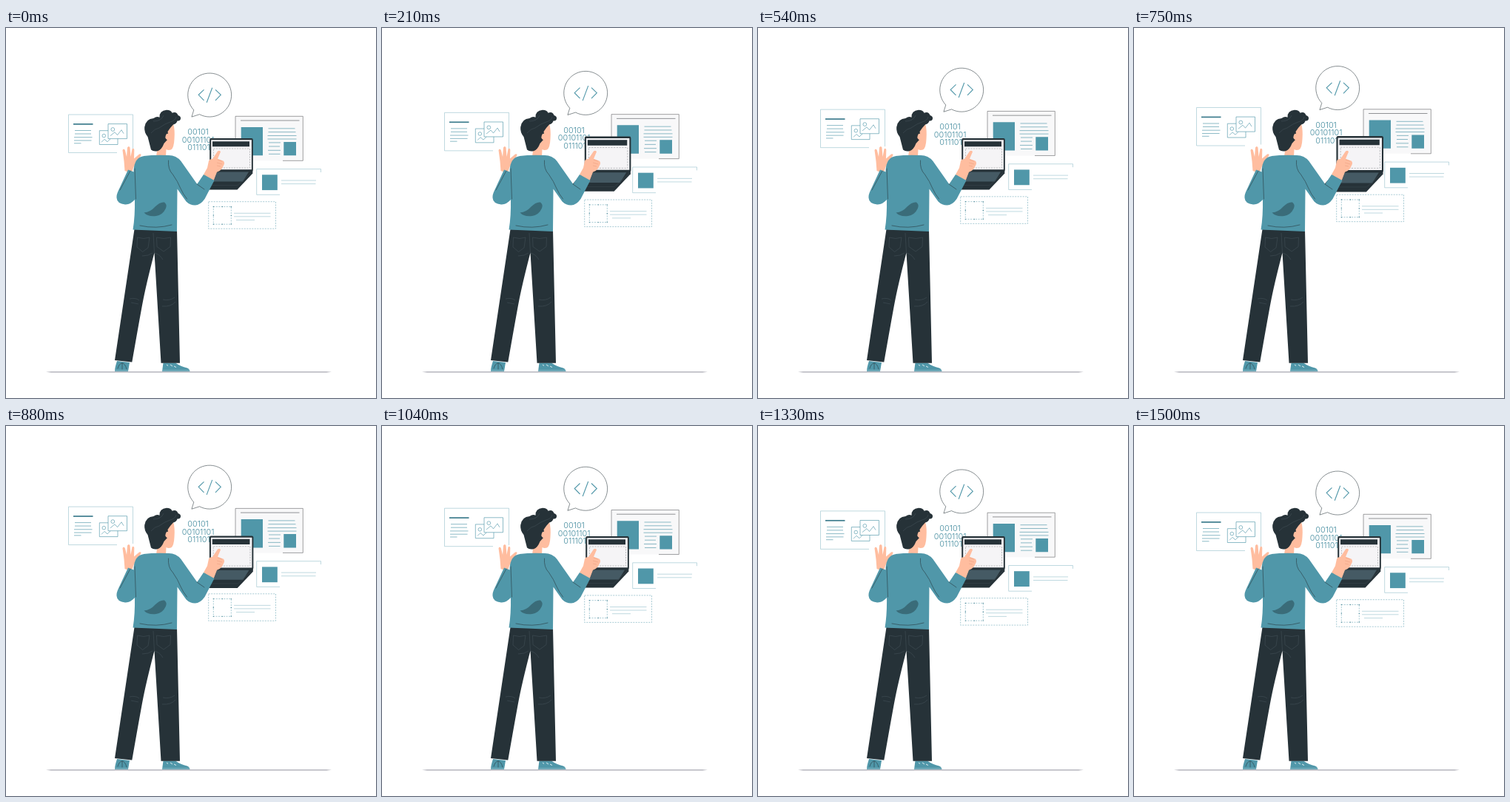
Animation of 500 by 500 pixels, one loop 1.54 s. Source, as an HTML page:

```html
<!DOCTYPE html>
<html lang="en">
<head>
<meta charset="utf-8">
<title>Developer at work</title>
<style>
  html, body { margin: 0; width: 100%; height: 100%; overflow: hidden; background: #fff; }
  svg { display: block; width: 100%; height: 100%; }
  .teal { fill: #5097a9; }
  .dark { fill: #263238; }
  .skin { fill: #ffbd9f; }
  .line { fill: none; stroke: #5097a9; stroke-width: .65; }
  .pale { fill: none; stroke: #9cc5d0; stroke-width: .65; }
  .ink { fill: none; stroke: #263238; stroke-width: .55; stroke-linecap: round; }
  .seam { fill: none; stroke: #46545c; stroke-width: .5; }
  .dash { fill: none; stroke: #5097a9; stroke-width: .5; stroke-dasharray: 2 1.5; }
  .white { fill: #fff; }
  .bold { stroke-width: 1.1; }
  text { font: 300 10.8px Inter, Lato, sans-serif; fill: #418a9d; }
</style>
</head>
<body>
<svg viewBox="0 0 500 500">
  <path d="M54 464.800l7-.9H433l7 .9-7 .9H61z" fill="#bfbfc6"/>

  <g id="floating">
    <!-- picture card -->
    <path class="pale" d="M150 168.500H84.500V117H171.500V167"/>
    <path d="M91 129.900h26.500" stroke="#3d7c8d" stroke-width="1.700"/>
    <path class="line" d="M93 138.500h22M93 143h22M92 147.700h24.500M92 152h23.500M92 155.800h9.500"/>
    <g class="line">
      <path d="M151 157.500h-24.700V138.700h24.700z" class="white"/>
      <circle cx="132.300" cy="145.600" r="2.300"/>
      <path d="M129 154.300l4-4 4 3.500 4-4"/>
      <path d="M138 129.600h25.500v20H138z" class="white"/>
      <circle cx="144.300" cy="137" r="2.400"/>
      <path d="M141 145.700l6-5 3.500 4 5.500-7 3 5"/>
    </g>

    <!-- speech bubble -->
    <path class="ink" d="M253.500 110.600A29.500 29.500 0 1 1 261.500 116.700L251.300 120z"/>
    <path class="line bold" d="M267.500 83.300l-7.300 7 7.300 7.500M278.700 80.800l-7.500 20M283 83.300l7.300 7-7.300 7.500"/>

    <text x="245.300" y="144.200">00101</text>
    <text x="237.800" y="154.900">00101101</text>
    <text x="245.300" y="165.200">011101</text>

    <!-- article panel -->
    <path d="M310 119.300h91.300v60H310z" fill="#f8f8f9"/>
    <path d="M310 179.300V119.300h91.300v60H374" fill="none" stroke="#6c6e72" stroke-width=".65"/>
    <path d="M317 125h79.500" stroke="#85878b" stroke-width=".9"/>
    <path class="teal" d="M317.700 134H347v38.300h-29.300zM375.300 154H392v18.300h-16.700z"/>
    <path class="line" d="M354.500 135.800h36M354.500 140.600h37M353.500 145.500h39M353.500 150h39M355 154.900h16M355 160h15M354 165.300h17M355 170.300h15.500"/>

    <!-- profile card -->
    <path class="pale" d="M370 225.300H338.700V190.600H425.500V195"/>
    <path class="teal" d="M346 198.300h20.800v20.800H346z"/>
    <path class="pale" d="M372 206h47M372 210.600h46.500"/>

    <!-- placeholder card -->
    <path class="dash" d="M273.700 234.700h90.800v36.500h-90.800z"/>
    <path class="dash" d="M280.300 241.500h24v23.700h-24z"/>
    <path d="M280.300 241.500h24v23.700h-24z" fill="none" stroke="#3d7c8d" stroke-width="1.300" stroke-linecap="round" stroke-dasharray="0 12 0 12 0 11.850 0 11.850"/>
    <path class="pale" d="M308 250.300h49.500M308 254.800h49.500M311 259.500h25"/>
  </g>

  <g id="laptop">
    <path class="dark" d="M275 192.500H333.300V196.500L312.500 218.500H262Q257 216 258.500 211z"/>
    <path d="M279.500 194.500H328L320 207.500H270z" fill="#455a64"/>
    <path d="M262 212.500h51l20-18" fill="none" stroke="#3c4950" stroke-width=".5"/>
    <rect class="dark" x="275.200" y="149" width="58.600" height="45" rx="2"/>
    <path d="M277.200 151.200H331.900V191.300H277.200z" fill="#f5f4f6"/>
    <path class="dark" d="M279 153.300h50v7h-50z"/>
    <path d="M280.500 163h49v26h-49z" fill="none" stroke="#9a9ca0" stroke-width=".6" stroke-dasharray="2 1.500"/>
  </g>

  <g id="person">
    <!-- shoes and trousers -->
    <path class="teal" d="M150 450l17 2-2 12h-18q0-5 3-14zM212.500 452.500h16.500q7 5 16 7 3 1 3.500 4.500H211z"/>
    <path d="M147 462.700h18M211 462.700h37" stroke="#b9d5dc" stroke-width=".5"/>
    <path class="ink" d="M151 460q2-7 6-7t6 8M157 453v8"/>
    <path d="M217 455l2 1.500M222 455l3 2M227 457l3 1.500" stroke="#fff" stroke-width=".8"/>
    <path class="dark" d="M173.500 272L147 449l23.300 2.500Q180 396 184.500 372T200.500 303.500L209.500 452.700H235L231 273z"/>
    <path class="seam" d="M177.500 283l-.5 13 7.500 6.500 7.500-5.500 2-14q-8 3-16.500 0zM203.500 283l.5 12.500 9 6.500 9-6.500.500-12.500q-9 3-19 0zM199 277l1.500 27M200 304q7 1 12 9M184 308q9 0 14-4M167 366q8-2 13 2M169 371l10 2M212 367q9 2 16-3M211 376q12 1 18-6"/>

    <!-- hands -->
    <path class="skin" d="M160.500 193l-1-13-2-15q1.500-3 3.300 0l2.300 9 .9-12.500q2-3 3.500 0l1 12.500 2-10.500q2-2 2.800 1l-.3 12 7-6q3-1 2.500 1.500l-8 12.500q-3 4-4.500 12z"/>
    <path class="skin" d="M267 198l5-9 2-9.500q1-3 5-2.500l7-10.500q3-2 4 .7l-4 9.500 8 3q2 3 0 6l-2 4q-3 4-7 5l-5 13z"/>
    <path d="M286 178l6 2M285 182l7 2M285 186l5 1" fill="none" stroke="#e79a7c" stroke-width=".5"/>

    <!-- head -->
    <path class="skin" d="M226 129q2.500 9 1.500 21-.5 12-4.500 14.500-4 1-6.500-.5L216 174h-13l4-32 11-12z"/>
    <path class="dark" d="M191.500 147q-5-6-4.300-13 1.800-11.500 12.300-12 4-3 8-1.300-.5-9 9.500-9.900 6 0 7.500 4 6-2.300 8 3.200 4 1 3.500 4.500t-4.500 3q-1 4-5.500 5-4 4-7.500 9.500 1.500 6-.5 11l-4.500 5q-3 8-8 10-6 1.500-9.500-1.500z"/>
    <path class="skin" d="M217 143q4-1 4.500 3.500t-4 4.500q-4-3-.5-8z"/>
    <path class="seam" d="M199 126q11 0 14-8M207 135q8-6 15-8 7-2 8-7M196 142q5-6 11-7"/>

    <!-- sweater -->
    <path class="teal" d="M165 191.500l9 3.500 1 36q-7 8-14 7.500-11-1-11.500-9-.5-4 2.500-10z"/>
    <path class="teal" d="M186 173q15-2 34-1 10 0 16.500 8l21.800 31 8.700-13 14.500 8-13 25q-6 8.500-13 8.500-7 0-12-5l-12-17-.5 57.500-59.500-2.500q3-18 2.500-42l-1.500-38q1-18 14-19.500z"/>
    <path class="ink" d="M174 190l1.500 41M168 193l-14 26M219.500 179q-1 12 6 19 7 10 10 18 4 9 9 15M258 211l10 7M181 267q22 5 43-1"/>
    <path d="M186.500 249.500q9-1 15-8 7-7 12.500-6 4 3 2 8-4 9-13 10.500-11 1.500-16.500-4.500z" fill="#3a6c79"/>
  </g>
</svg>
<script>
  const LOOP = 1540, FPS = 24, LAST = 36;
  const floating = document.getElementById("floating");
  const laptop = document.getElementById("laptop");

  // Linear rise and fall: 0 at start, 1 at peak, 0 at end.
  const beat = (p, start, peak, end) =>
    Math.max(0, Math.min((p - start) / (peak - start), (end - p) / (end - peak)));

  function draw(now) {
    const step = Math.min(LAST, Math.floor((now % LOOP + 5) * FPS / 1000));
    const p = step / LAST;
    const scale = 1 + 0.085 * (beat(p, 0, 0.1, 0.3) + beat(p, 0.4, 0.5, 0.6));
    floating.setAttribute("transform", `translate(0 ${-9.5 * beat(p, 0, 0.5, 1)})`);
    laptop.setAttribute("transform", `translate(296 184) scale(${scale}) translate(-296 -184)`);
  }

  let start;
  function tick(now) {
    start ??= now;
    draw(now - start);
    requestAnimationFrame(tick);
  }
  draw(0);
  requestAnimationFrame(tick);
</script>
</body>
</html>
```
